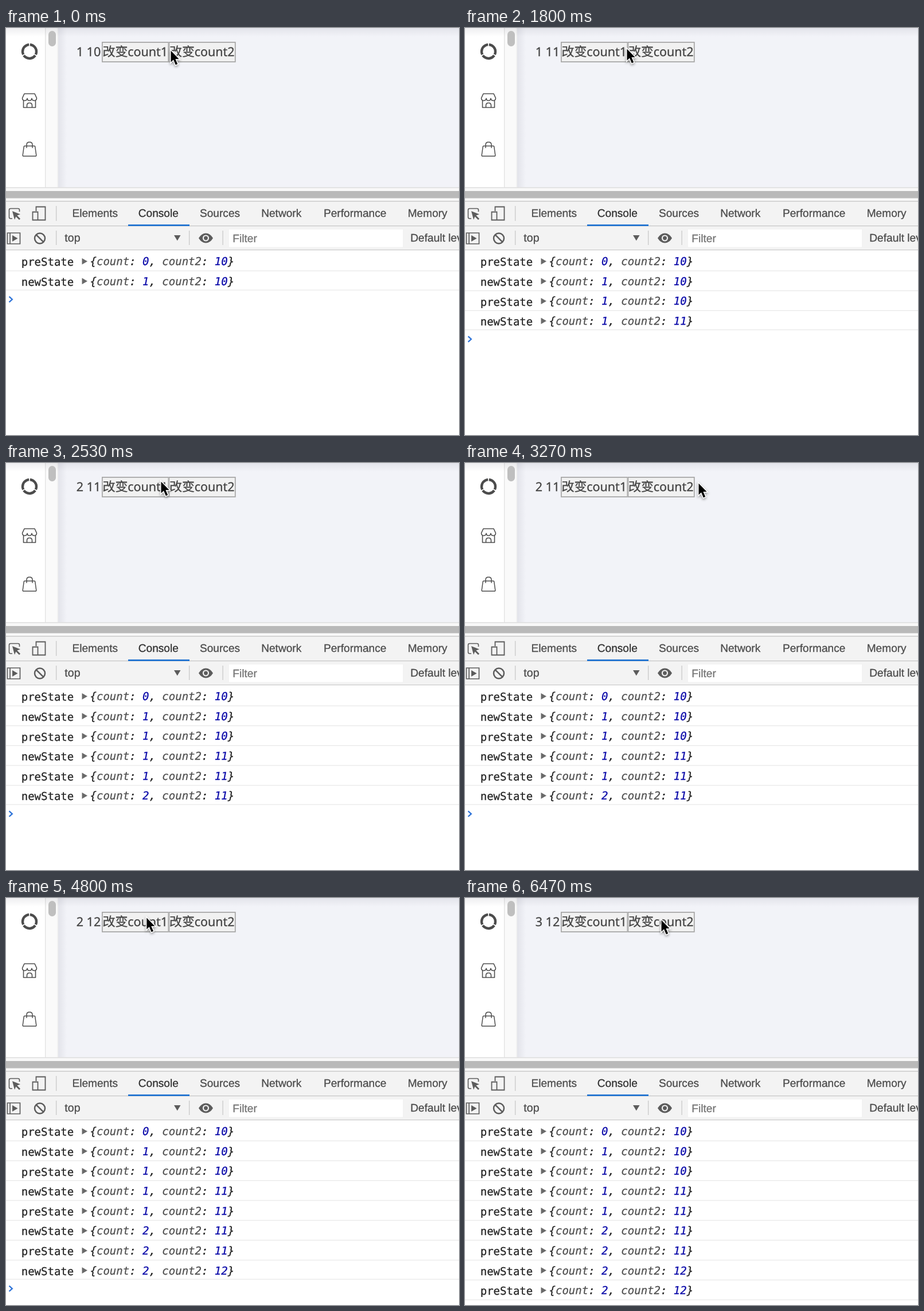
An HTML page with a canvas for the animation above (6940 ms loop, 790 by 709 pixels).

```html
<!DOCTYPE html>
<html lang="en">
<head>
<meta charset="utf-8">
<title>Counter state console</title>
<style>
  html, body { margin: 0; width: 100%; height: 100%; overflow: hidden; background: #fff; }
  canvas { display: block; }
</style>
</head>
<body>
<canvas id="stage" width="790" height="709"></canvas>
<script>
const ctx = document.getElementById('stage').getContext('2d');
ctx.textRendering = 'geometricPrecision';
const LOOP = 6940, STEPS_PER_MS = 0.015;
const UI = '"Liberation Sans", Arial, sans-serif';
const MONO = '"DejaVu Sans Mono", monospace';
const PAGE = '"Noto Sans", sans-serif';
const CJK = '"Noto Sans CJK SC", "Noto Sans CJK", sans-serif';
const ROW_HEIGHT = 34.62, CONSOLE_TOP = 388;

// Pointer keys: [step, x, y], one step being 1/15 s
const pointerKeys = [
  [0, 287, 38], [5, 296, 32], [9, 292, 34], [26, 289, 35], [27, 282, 35], [33, 264, 32],
  [38, 270, 31], [39, 272, 31], [42, 272, 31], [49, 407, 34], [51, 407, 34], [58, 365, 31],
  [62, 363, 31], [73, 242, 33], [78, 236, 34], [84, 240, 35], [94, 342, 37]
];

// Each click updates the page at `shown` and writes two rows at `logged`
const clicks = [
  { shown: 0, logged: 0, state: [1, 10] },
  { shown: 8, logged: 12, state: [1, 11] },
  { shown: 36, logged: 38, state: [2, 11] },
  { shown: 57, logged: 59, state: [2, 12] },
  { shown: 75, logged: 77, state: [3, 12] }
];

function rect(x, y, w, h, color) {
  ctx.fillStyle = color;
  ctx.fillRect(x, y, w, h);
}

// A hairline stroke gives the slightly heavier look of smoothed type
function text(str, x, y, font, color) {
  ctx.font = font;
  ctx.fillStyle = ctx.strokeStyle = color;
  ctx.lineWidth = 0.3;
  ctx.fillText(str, x, y);
  ctx.strokeText(str, x, y);
}

function stroke(path, color, width) {
  ctx.strokeStyle = color;
  ctx.lineWidth = width;
  ctx.stroke(new Path2D(path));
}

function fill(path, color) {
  ctx.fillStyle = color;
  ctx.fill(new Path2D(path));
}

function circle(x, y, r, color, width) {
  ctx.beginPath();
  ctx.arc(x, y, r, 0, Math.PI * 2);
  if (width) {
    ctx.strokeStyle = color;
    ctx.lineWidth = width;
    ctx.stroke();
  } else {
    ctx.fillStyle = color;
    ctx.fill();
  }
}

function fade(x, y, w, h, horizontal, color) {
  const g = ctx.createLinearGradient(x, y, horizontal ? x + w : x, horizontal ? y : y + h);
  g.addColorStop(0, color);
  g.addColorStop(1, 'rgba(90,90,110,0)');
  rect(x, y, w, h, g);
}

function drawSidebarIcons() {
  const dark = '#4c4c4c';
  ctx.strokeStyle = dark;
  ctx.lineWidth = 4.4;
  for (let i = 0; i < 3; i++) {
    const start = -Math.PI / 2 + i * Math.PI * 2 / 3;
    ctx.beginPath();
    ctx.arc(41, 41, 12, start + 0.07, start + Math.PI * 2 / 3 - 0.07);
    ctx.stroke();
  }
  ctx.lineJoin = ctx.lineCap = 'round';
  stroke('M32 114.5H50L53.5 122Q53.5 126.5 49.3 126.5Q45.3 126.5 45 122.5Q44.5 126.5 41 126.5' +
    'Q37.3 126.5 37 122.5Q36.6 126.5 32.6 126.5Q28.5 126.5 28.5 122Z' +
    'M30.5 127V138.5H51.5V127M36.5 138V135Q36.5 130.5 41 130.5Q45.5 130.5 45.5 135V138', dark, 1.6);
  stroke('M32.5 205.5H49.5Q50.5 205.5 50.7 206.5L52.8 221.5Q53 223.3 51 223.3H31Q29 223.3 29.2 221.5' +
    'L31.3 206.5Q31.5 205.5 32.5 205.5M36 208.5V203.5Q36 198.8 41 198.8Q46 198.8 46 203.5V208.5', dark, 1.5);
  ctx.lineJoin = 'miter';
  ctx.lineCap = 'butt';
}

function drawButton(x, label) {
  rect(x, 24, 117, 35.5, '#f1f1f1');
  ctx.strokeStyle = '#a5a5a5';
  ctx.lineWidth = 1.7;
  ctx.strokeRect(x + 0.9, 24.9, 115.4, 34);
  text('改变', x + 1.4, 49, `22px ${CJK}`, '#444');
  text(label, x + 45.2, 49, `21.5px ${PAGE}`, '#444');
}

function drawPage([count, count2]) {
  rect(0, 0, 790, 278, '#f2f3f8');
  rect(0, 0, 68, 278, '#fff');
  rect(68, 0, 23, 278, '#fafafa');
  rect(68, 0, 1.3, 278, '#e2e2e2');
  rect(89.5, 0, 1.2, 278, '#ececec');
  fade(91, 0, 15, 278, true, 'rgba(90,90,110,.10)');
  fade(0, 0, 790, 15, false, 'rgba(90,90,110,.10)');
  ctx.beginPath();
  ctx.roundRect(74, 5, 13, 27, 6.5);
  ctx.fillStyle = '#bfbfbf';
  ctx.fill();
  drawSidebarIcons();
  text(`${count} ${count2}`, 122.7, 49, `21.5px ${PAGE}`, '#444');
  drawButton(167, 'count1');
  drawButton(283.5, 'count2');
}

function drawToolbars() {
  const grey = '#5c5c5c', line = '#cacaca';
  rect(0, 277.5, 790, 25, '#f8f8f8');
  rect(0, 277.5, 790, 1.2, '#d8d8d8');
  rect(0, 284, 790, 12.5, '#b9b9b9');
  rect(0, 301, 790, 86, '#f3f3f3');
  rect(0, 301, 790, 1.5, line);
  rect(0, 344, 790, 1.4, line);
  rect(0, 386, 790, 1.4, line);
  rect(213, 342.3, 107, 2.7, '#1a6fd0');

  stroke('M11 332H8Q5.5 332 5.5 329.5V317Q5.5 314.5 8 314.5H21Q23.5 314.5 23.5 317V320', grey, 1.6);
  fill('M11 319L25 324.5L19.3 326.6L25 332.3L23 334.2L17.3 328.5L15 334Z', grey);
  stroke('M52.5 319V311.5H68.5V334.5H56M46.5 320.5H55.5V334.5H46.5Z', grey, 1.8);
  stroke('M2.5 357H24.5V376H2.5ZM7 357V376', grey, 1.7);
  fill('M11 361L20.5 366.5L11 372Z', grey);
  circle(59, 366.5, 9, grey, 2.5);
  stroke('M52.6 360.1L65.4 372.9', grey, 2.5);
  fill('M293 361H304.5L298.75 370.5Z', grey);
  fill('M336 366Q341 357.5 348.5 357.5Q356 357.5 361 366Q356 374.5 348.5 374.5Q341 374.5 336 366Z', grey);
  circle(348.5, 366, 5.6, '#f3f3f3');
  circle(348.5, 366, 3.4, grey);

  rect(87, 310, 1.3, 26, line);
  for (const x of [87, 319, 377.5]) rect(x, 353, 1.3, 25, line);
  rect(389, 351, 303, 30.5, '#fff');

  const tabs = { Elements: 115.5, Console: 230.8, Sources: 338, Network: 445.2, Performance: 554, Memory: 700.7 };
  for (const name in tabs) {
    text(name, tabs[name], 329.2, `19.1px ${UI}`, name === 'Console' ? '#303030' : '#4c4c4c');
  }
  text('top', 102.3, 372, `19.6px ${UI}`, '#4c4c4c');
  text('Filter', 395.2, 373.3, `19.2px ${UI}`, '#757575');
  text('Default levels', 705.2, 372, `19.2px ${UI}`, '#4c4c4c');
}

function drawLogRow(index, label, [count, count2]) {
  const y = CONSOLE_TOP + index * ROW_HEIGHT;
  text(label, 26.7, y + 26.3, `19px ${MONO}`, '#262626');
  fill(`M132.5 ${y + 13}L142 ${y + 18.5}L132.5 ${y + 24}Z`, '#6a6a6a');
  const parts = [
    ['{', '#222'], ['count', '#505050'], [': ', '#222'], [count, '#0d0caa'], [', ', '#222'],
    ['count2', '#505050'], [': ', '#222'], [count2, '#0d0caa'], ['}', '#222']
  ];
  let x = 146.5;
  for (const [part, color] of parts) {
    text(part, x, y + 25.2, `italic 19px ${MONO}`, color);
    x += ctx.measureText(part).width;
  }
}

function drawConsole(step) {
  rect(0, 387.4, 790, 322, '#fff');
  let previous = [0, 10], rows = 0;
  for (const { logged, state } of clicks) {
    if (step < logged) break;
    drawLogRow(rows++, 'preState', previous);
    drawLogRow(rows++, 'newState', state);
    previous = state;
  }
  for (let i = 1; i <= rows; i++) {
    rect(0, CONSOLE_TOP + i * ROW_HEIGHT - (i === rows ? 1.4 : 0.2), 790, 1.3, '#e9e9e9');
  }
  const y = CONSOLE_TOP + rows * ROW_HEIGHT + 15.5;
  stroke(`M5.5 ${y - 4.8}L10.8 ${y}L5.5 ${y + 4.8}`, '#2f74d8', 2.3);
}

function pointerAt(step) {
  const next = pointerKeys.findIndex(key => key[0] > step);
  if (next < 0) return pointerKeys.at(-1).slice(1);
  const [s0, x0, y0] = pointerKeys[next - 1], [s1, x1, y1] = pointerKeys[next];
  const p = (step - s0) / (s1 - s0), ease = p * p * (3 - 2 * p);
  return [x0 + (x1 - x0) * ease, y0 + (y1 - y0) * ease];
}

function drawPointer([x, y]) {
  const arrow = 'M.5 1.5V21.5L5 17.3L8.8 26.2L12.2 24.7L8.4 16H14.6Z';
  ctx.save();
  ctx.translate(x, y);
  ctx.shadowColor = 'rgba(0,0,0,.4)';
  ctx.shadowBlur = 4;
  ctx.shadowOffsetY = 2;
  stroke(arrow, '#fff', 3);
  ctx.shadowColor = 'transparent';
  fill(arrow, '#000');
  ctx.restore();
}

function draw(now) {
  const step = Math.floor((now % LOOP + 4) * STEPS_PER_MS);
  drawPage(clicks.findLast(click => step >= click.shown).state);
  drawToolbars();
  drawConsole(step);
  drawPointer(pointerAt(step));
}

const start = performance.now();
function tick() {
  draw(performance.now() - start);
  requestAnimationFrame(tick);
}
tick();
</script>
</body>
</html>
```
